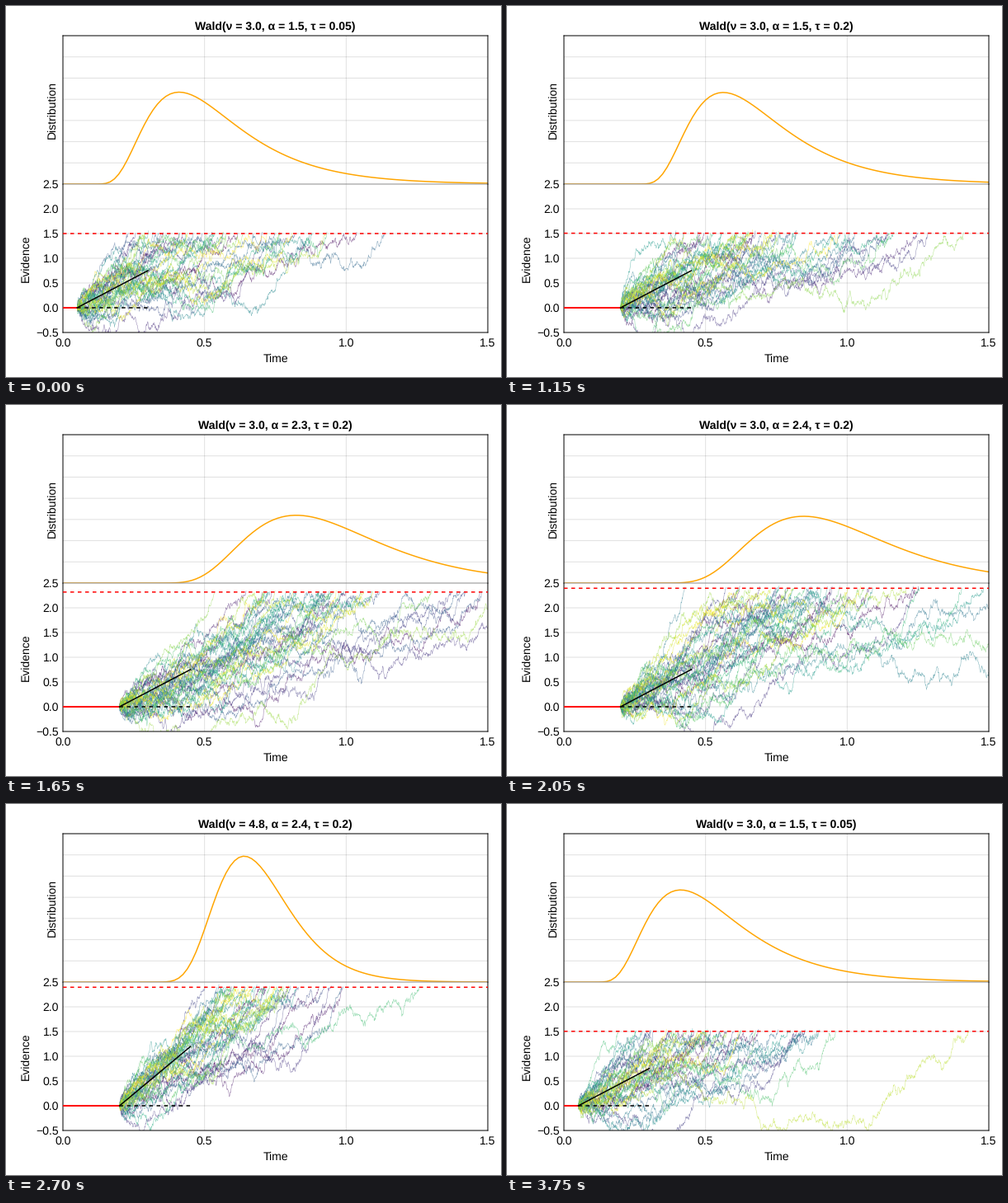
These frames come from a looping animation (600 by 450 pixels, 4.5 s). A matplotlib script:

```python
import math

import matplotlib.pyplot as plt
import numpy as np
from matplotlib.animation import FuncAnimation
from matplotlib.collections import LineCollection

WIDTH, HEIGHT, DPI = 600, 450, 72  # at 72 dpi one point is one pixel
FRAMES, INTERVAL = 90, 50
DT = 20 / (FRAMES - 1)             # story time per frame
LEFT, RIGHT, TOP, MIDDLE, BOTTOM = 69, 584, 36, 216, 396
X_MAX = 1.5
GRID = (0, 0, 0, 0.12)

# Each move is (start, end, from, to) in story time.
DRIFT = [(9, 13, 3.0, 5.0), (14, 17, 5.0, 3.0)]
BOUND = [(5, 8, 1.5, 2.4), (14, 17, 2.4, 1.5)]
DELAY = [(0, 3, 0.05, 0.2), (14, 17, 0.2, 0.05)]
WINDOWS = [(0, 3), (5, 8), (9, 13), (14, 17)]

N_WALKS, WALK_STEP = 40, 0.001
WALK_COLORS = plt.get_cmap("viridis")(np.linspace(0, 1, N_WALKS), alpha=0.6)

plt.rcParams.update({
    "font.family": "Liberation Sans",
    "font.size": 14,
    "text.hinting": "none",
    "path.snap": False,
})


def clamp_frame(frame, end):
    """Motion stops on the last frame inside its window."""
    return min(frame, math.floor(end / DT))


def value_at(frame, moves):
    value = moves[0][2]
    for start, end, a, b in moves:
        if frame * DT >= start:
            x = (clamp_frame(frame, end) * DT - start) / (end - start)
            value = a + (b - a) * (1 - math.cos(math.pi * x)) / 2
    return value


def last_redraw(frame):
    return max(clamp_frame(frame, end) for start, end in WINDOWS
               if frame * DT >= start)


def wald_pdf(t, nu, alpha, tau):
    s = np.maximum(t - tau, 1e-6)
    density = alpha / np.sqrt(2 * np.pi * s**3) * np.exp(-(alpha - nu * s) ** 2 / (2 * s))
    return np.where(t > tau, density, 0)


def random_walks(seed, nu, alpha, tau):
    rng = np.random.default_rng(seed)
    n = int((X_MAX - tau) / WALK_STEP) + 10
    times = tau + WALK_STEP * np.arange(n + 1)
    steps = rng.normal(nu * WALK_STEP, math.sqrt(WALK_STEP), (N_WALKS, n))
    walks = []
    for path in np.cumsum(steps, axis=1):
        path = np.insert(path, 0, 0)
        hits = np.flatnonzero(path >= alpha)
        stop = hits[0] + 1 if hits.size else n + 1
        walks.append(np.column_stack([times[:stop], path[:stop]]))
    return walks


def make_axes(top, bottom, y_min, y_max):
    ax = fig.add_axes([LEFT / WIDTH, 1 - bottom / HEIGHT,
                       (RIGHT - LEFT) / WIDTH, (bottom - top) / HEIGHT])
    ax.set(xlim=(0, X_MAX), ylim=(y_min, y_max), xticks=[], yticks=[])
    ax.patch.set_visible(False)
    for spine in ax.spines.values():
        spine.set_linewidth(1)
        spine.set_snap(False)
    for x in (0.5, 1.0):
        ax.axvline(x, color=GRID, lw=1, zorder=0, snap=False)
    for y in np.arange(y_min + 0.5, y_max, 0.5):
        ax.axhline(y, color=GRID, lw=1, zorder=0, snap=False)
    return ax


def label(x, y, text, **style):
    style = {"ha": "center", "va": "baseline", "rotation_mode": "anchor", **style}
    return fig.text(x / WIDTH, 1 - y / HEIGHT, text, **style)


fig = plt.figure(figsize=(WIDTH / DPI, HEIGHT / DPI), dpi=DPI, facecolor="white")
upper = make_axes(TOP, MIDDLE, 0, 3.5)
lower = make_axes(MIDDLE, BOTTOM, -0.5, 2.5)
upper.spines["bottom"].set_visible(False)
lower.spines["top"].set_color("#8c8c8c")
lower.spines["top"].set_zorder(2.4)

center = (LEFT + RIGHT) / 2
title = label(center, 29, "", weight="bold")
label(center, 432, "Time")
label(60, (TOP + MIDDLE) / 2, "Distribution", rotation=90)
label(28, (MIDDLE + BOTTOM) / 2, "Evidence", rotation=90)
for x in (0, 0.5, 1, 1.5):
    label(LEFT + x / X_MAX * (RIGHT - LEFT), 413, f"{x:.1f}")
for y in np.arange(-0.5, 2.6, 0.5):
    label(64, BOTTOM - (y + 0.5) * 60 + 5, f"{y:.1f}".replace("-", "\u2212"), ha="right")

grid_t = np.linspace(0, X_MAX, 100)
density, = upper.plot([], [], color="orange", lw=1.5)
walks = LineCollection([], colors=WALK_COLORS, linewidths=0.5, zorder=2)
lower.add_collection(walks, autolim=False)
dashed = dict(lw=1.5, dashes=(3, 3), dash_capstyle="butt", zorder=3, snap=False)
bound = lower.axhline(0, color="red", **dashed)
wait, = lower.plot([], [], color="red", lw=2, zorder=3, snap=False)
slope, = lower.plot([], [], color="black", lw=1.5, zorder=3)
base, = lower.plot([], [], color="black", **dashed)


def update(frame):
    nu, alpha, tau = (value_at(frame, moves) for moves in (DRIFT, BOUND, DELAY))
    title.set_text(f"Wald(ν = {nu:.1f}, α = {alpha:.1f}, τ = {round(tau, 2)})")
    density.set_data(grid_t, wald_pdf(grid_t, nu, alpha, tau))
    walks.set_segments(random_walks(last_redraw(frame), nu, alpha, tau))
    bound.set_ydata([alpha, alpha])
    wait.set_data([0, tau], [0, 0])
    slope.set_data([tau, tau + 0.25], [0, 0.25 * nu])
    base.set_data([tau, tau + 0.25], [0, 0])
    return title, density, walks, bound, wait, slope, base


animation = FuncAnimation(fig, update, frames=FRAMES, interval=INTERVAL,
                          repeat=True, repeat_delay=0, blit=False)
plt.show()
```
